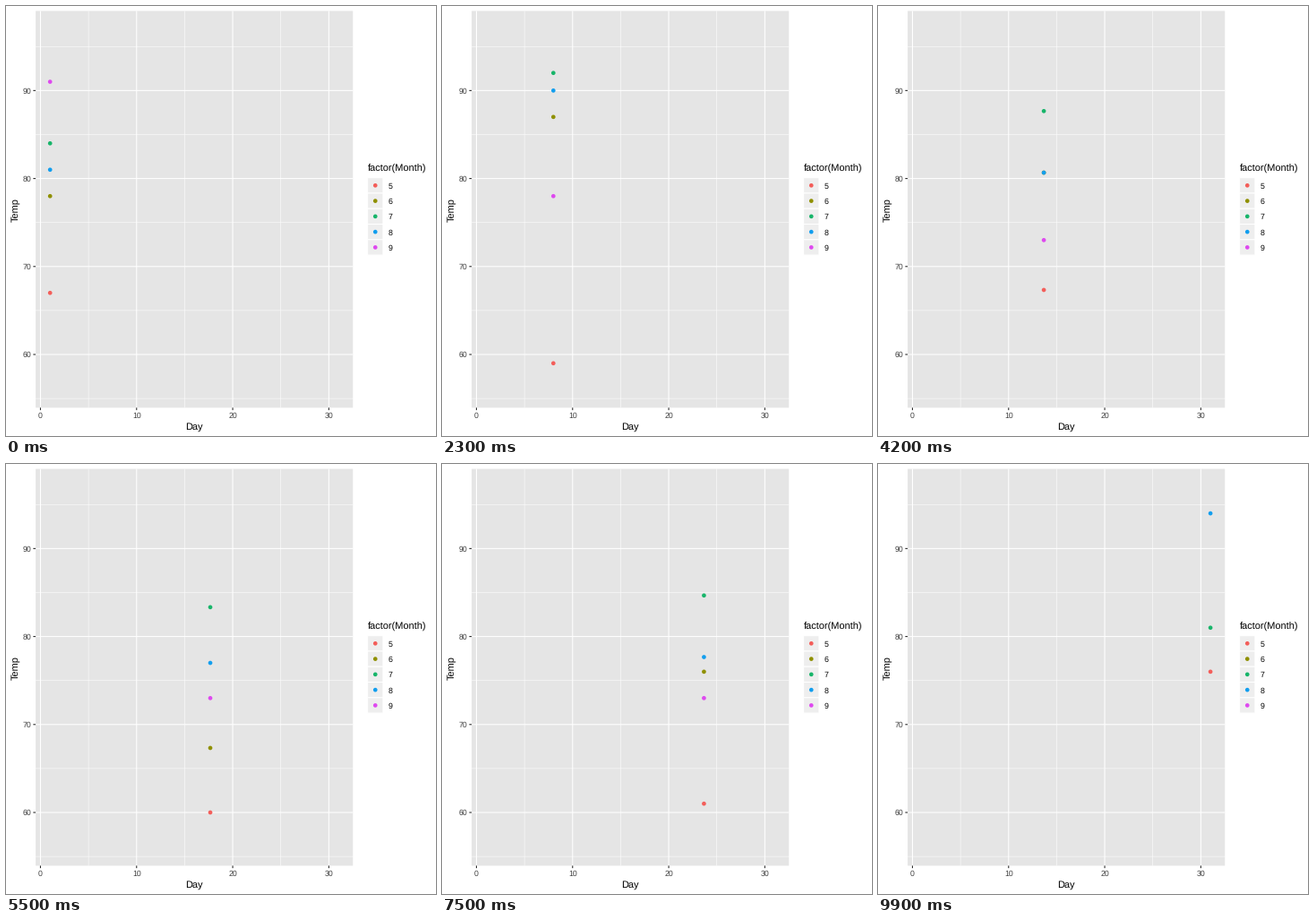
A matplotlib script that plays this animation: 480x480 px, repeating every 10000 ms.

```python
import matplotlib.pyplot as plt
import numpy as np
from matplotlib.animation import FuncAnimation
from matplotlib.patches import Circle, Rectangle

SIZE, DPI = 480, 72          # at 72 dpi one point is one pixel
FRAMES, INTERVAL = 100, 100
LEFT, RIGHT, TOP, BOTTOM = 33.1, 387.2, 5.5, 448.4
LAST_DAY = 31
RADIUS = 2.33

# Daily temperatures from the airquality data set
may = [67, 72, 74, 62, 56, 66, 65, 59, 61, 69, 74, 69, 66, 68, 58, 64,
       66, 57, 68, 62, 59, 73, 61, 61, 57, 58, 57, 67, 81, 79, 76]
june = [78, 74, 67, 84, 85, 79, 82, 87, 90, 87, 93, 92, 82, 80, 79, 77,
        72, 65, 73, 76, 77, 76, 76, 76, 75, 78, 73, 80, 77, 83]
july = [84, 85, 81, 84, 83, 83, 88, 92, 92, 89, 82, 73, 81, 91, 80, 81,
        82, 84, 87, 85, 74, 81, 82, 86, 85, 82, 86, 88, 86, 83, 81]
august = [81, 81, 82, 86, 85, 87, 89, 90, 90, 92, 86, 86, 82, 80, 79, 77,
          79, 76, 78, 78, 77, 72, 75, 79, 81, 86, 88, 97, 94, 96, 94]
september = [91, 92, 93, 93, 87, 84, 80, 78, 75, 73, 81, 76, 77, 71, 71, 78,
             67, 76, 68, 82, 64, 71, 81, 69, 63, 70, 77, 75, 76, 68]
months = [may, june, july, august, september]
colors = ["#f35e5a", "#8f9000", "#18b56a", "#129eee", "#de49ef"]

plt.rcParams["font.family"] = "Liberation Sans"
plt.rcParams["text.hinting"] = "none"

fig = plt.figure(figsize=(SIZE / DPI, SIZE / DPI), dpi=DPI, facecolor="white")
ax = fig.add_axes([0, 0, 1, 1])
ax.set(xlim=(0, SIZE), ylim=(SIZE, 0))
ax.axis("off")


def px(day):
    return LEFT + (day + 0.5) / 33 * (RIGHT - LEFT)


def py(temp):
    return BOTTOM - (temp - 53.95) / 45.1 * (BOTTOM - TOP)


def line(xs, ys, color, width):
    ax.plot(xs, ys, color=color, lw=width, solid_capstyle="butt", snap=False)


def rect(x, y, w, h, fill, edge="none", width=0):
    ax.add_patch(Rectangle((x, y), w, h, facecolor=fill, edgecolor=edge,
                           lw=width, snap=False))


def dot(x, y, color):
    return ax.add_patch(Circle((x, y), RADIUS, facecolor=color, lw=0, zorder=4))


def label(x, y, text, size=8.77, color="black", **kw):
    ax.text(x, y, text, fontsize=size, color=color, va="baseline", **kw)


def draw_panel():
    rect(LEFT, TOP, RIGHT - LEFT, BOTTOM - TOP, "#e5e5e5")
    for day in (5, 15, 25):
        line([px(day)] * 2, [TOP, BOTTOM], "white", 0.53)
    for temp in (55, 65, 75, 85, 95):
        line([LEFT, RIGHT], [py(temp)] * 2, "white", 0.53)
    for day in (0, 10, 20, 30):
        x = px(day)
        line([x, x], [TOP, BOTTOM], "white", 1.07)
        line([x, x], [BOTTOM, BOTTOM + 2.74], "#2a2a2a", 1.07)
        label(x, 460, str(day), color="#404040", ha="center")
    for temp in (60, 70, 80, 90):
        y = py(temp)
        line([LEFT, RIGHT], [y, y], "white", 1.07)
        line([LEFT - 2.74, LEFT], [y, y], "#2a2a2a", 1.07)
        label(28.2, y + 3.3, str(temp), color="#404040", ha="right")
    label((LEFT + RIGHT) / 2, 472.8, "Day", 10.96, ha="center")
    label(13.5, (TOP + BOTTOM) / 2 + 0.5, "Temp", 10.96, ha="center",
          rotation=90, rotation_mode="anchor")


def draw_legend():
    x, key = 403.6, 17.28
    label(x, 185.2, "factor(Month)", 10.96)
    for i, color in enumerate(colors):
        y = 200.3 + i * key
        rect(x, y - key / 2, key, key, "#eeeeee", "white", 1.07)
        dot(x + key / 2, y, color)
        label(x + key + 5.5, y + 3.3, str(i + 5))


draw_panel()
draw_legend()
dots = [dot(0, 0, c) for c in colors]

# Each day lands on a whole frame, with straight tweens in between
key_frames = np.round(np.arange(LAST_DAY) * (FRAMES - 1) / (LAST_DAY - 1))


def update(frame):
    day = np.interp(frame, key_frames, np.arange(1, LAST_DAY + 1))
    for point, temps in zip(dots, months):
        keys = key_frames[:len(temps)]
        point.set_visible(bool(frame <= keys[-1]))
        point.set_center((px(day), py(np.interp(frame, keys, temps))))
    return dots


anim = FuncAnimation(fig, update, frames=FRAMES, interval=INTERVAL,
                     repeat=True, repeat_delay=0)
plt.show()
```
